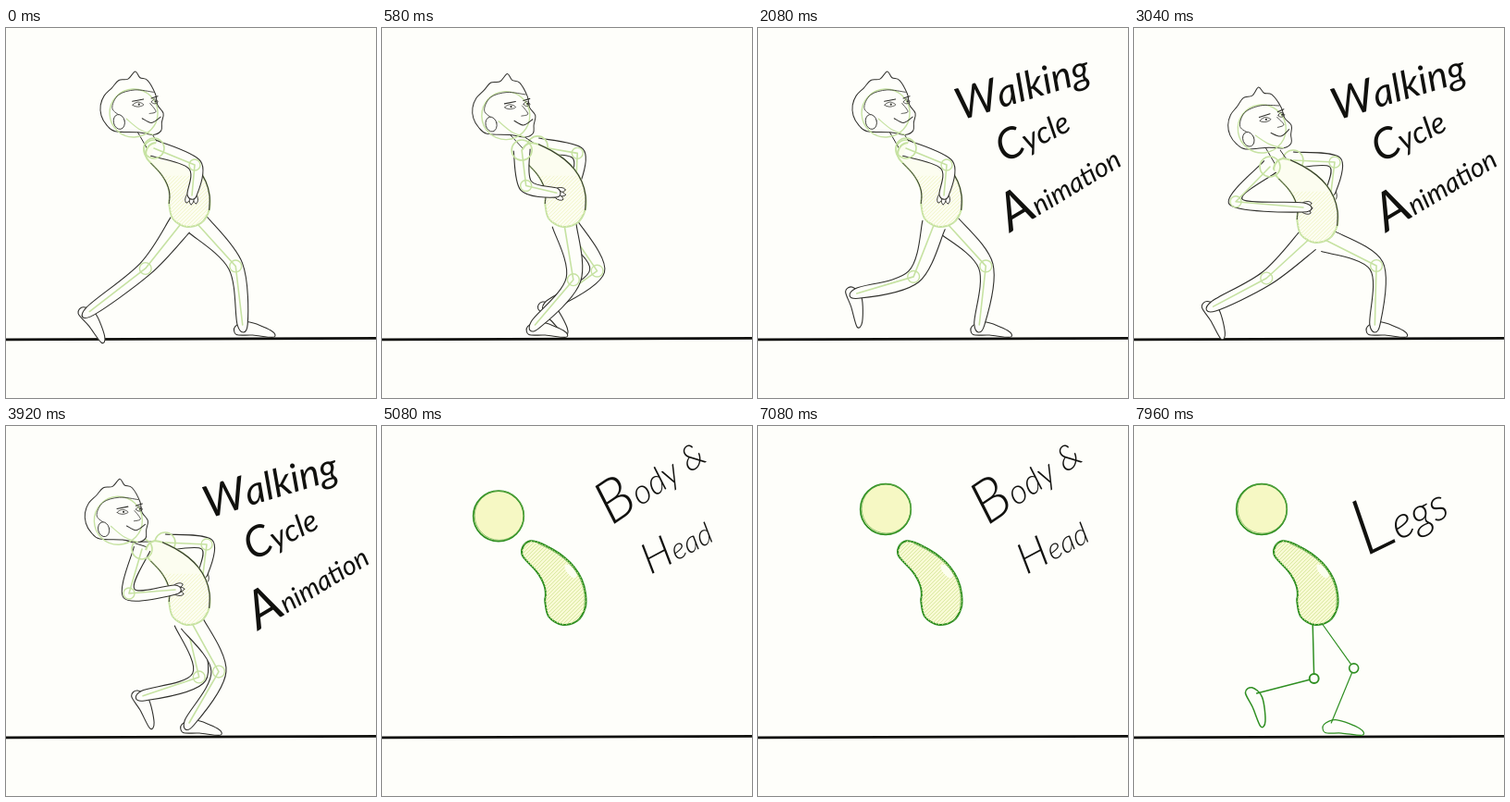
Recreate the animation shown at these times as an HTML page with a canvas. Size 400 by 400 pixels, loop 8000 ms.

```html
<!DOCTYPE html>
<html lang="en">
<head>
<meta charset="utf-8">
<title>Walking Cycle</title>
<style>
  html, body { margin: 0; width: 100%; height: 100%; overflow: hidden; background: #fefefa; }
  canvas { display: block; width: 100vw; height: 100vh; }
</style>
</head>
<body>
<canvas id="stage" width="400" height="400"></canvas>
<script>
const ctx = document.getElementById('stage').getContext('2d');
const LOOP = 8000, FPS = 24, CYCLE = 17;
const PAPER = '#fefefa', INK = '#30302c', SKETCH = '#c6e2a2', GREEN = '#2f8f22', BLACK = '#11110e';
const TAU = Math.PI * 2;
const { sin, cos, max, min, hypot, atan2, acos } = Math;

const mix = (a, b, k) => a + (b - a) * k;
const clamp = (v, low, high) => max(low, min(high, v));

// A wave over one cycle that peaks at 1, and the same wave without its negative half.
const wave = (u, peak) => cos(TAU * (u - peak));
const bump = (u, peak, power) => max(0, wave(u, peak)) ** power;

function paint(fill, stroke, width = 1) {
  if (fill) { ctx.fillStyle = fill; ctx.fill(); }
  if (stroke) { ctx.strokeStyle = stroke; ctx.lineWidth = width; ctx.stroke(); }
}

// Smooth curve through [x, y] points.
function curve(pts, closed) {
  const n = pts.length;
  const at = i => pts[closed ? (i + n) % n : clamp(i, 0, n - 1)];
  ctx.beginPath();
  ctx.moveTo(...pts[0]);
  for (let i = 0; i < (closed ? n : n - 1); i++) {
    const [a, b, c, d] = [at(i - 1), at(i), at(i + 1), at(i + 2)];
    ctx.bezierCurveTo(b[0] + (c[0] - a[0]) / 6, b[1] + (c[1] - a[1]) / 6,
      c[0] - (d[0] - b[0]) / 6, c[1] - (d[1] - b[1]) / 6, ...c);
  }
}

function stroke(pts, color, width) {
  curve(pts, false);
  paint(null, color, width);
}

function line(pts, color, width) {
  ctx.beginPath();
  for (const p of pts) ctx.lineTo(...p);
  paint(null, color, width);
}

function disc(x, y, r, fill, color, width) {
  ctx.beginPath();
  ctx.arc(x, y, r, 0, TAU);
  paint(fill, color, width);
}

function hatch(x, y, size, gap, color) {
  ctx.save();
  ctx.clip();
  for (let d = -size; d < size; d += gap) line([[x + d, y + size], [x + d + size, y]], color, .8);
  ctx.restore();
}

// The body is a bent spine whose radius grows towards the hips.
const SIDE = 7;
const BEAN = (() => {
  const pts = [];
  const put = (t, turn) => {
    const s = 1 - t, r = 12 + 10 * sin(t * TAU / 4);
    const x = s * s * 163 + 2 * s * t * 203 + t * t * 198;
    const y = s * s * 136 + 2 * s * t * 161 + t * t * 193;
    const heading = atan2(mix(25, 32, t), mix(40, -5, t)) + turn * TAU / 4;
    pts.push([x + r * cos(heading), y + r * sin(heading)]);
  };
  for (let i = 0; i < SIDE; i++) put(i / (SIDE - 1), -1);
  for (let a = -.5; a <= .5; a += .5) put(1, a);
  for (let i = SIDE - 1; i >= 0; i--) put(i / (SIDE - 1), 1);
  for (let a = 1.5; a <= 2.5; a += .5) put(0, a);
  return pts;
})();

// --- Motion ---

const dropAt = u => 17 * bump(u, .53, 3);

function headAt(u) {
  const back = bump(u, .747, 12);
  return { x: 138 - 18 * back, y: 90 + 11 * back, tilt: -.03 - dropAt(u) * .007 };
}

// u = 0 is the heel strike in front, u = .5 the push-off behind.
function legAt(u, drop) {
  const ax = 173 + 89 * wave(u, .06);
  const ay = 321 - 34 * bump(u, .68, 1);
  const pitch = .32 + 1.2 * bump(u, .65, .7);
  const hx = 198 + (ax - 173) * .12, hy = 213 + drop;
  const reach = hypot(ax - hx, ay - hy);
  const thigh = 60, shin = max(64, reach - 59);
  const bend = acos(clamp((thigh ** 2 + reach ** 2 - shin ** 2) / (2 * thigh * reach), -1, 1));
  const angle = atan2(ay - hy, ax - hx) - bend;
  return { hip: [hx, hy], knee: [hx + thigh * cos(angle), hy + thigh * sin(angle)], ankle: [ax, ay], pitch };
}

// Shoulder, elbow and hand between the arm's two extremes.
function armAt(u, forward, back) {
  const k = clamp(.5 + 1.75 * wave(u, .59), 0, 1);
  return forward.map((p, i) => p.map((v, j) => mix(v, back[i][j], k)));
}

function nearArmAt(u) {
  const flare = dropAt(u);
  return armAt(u, [[160, 130], [204, 148], [201, 181]],
    [[147, 133], [133 - flare * 1.35, 181 - flare * .6], [183, 177]]);
}

const farArmAt = u => armAt(u, [[160, 132], [199, 151], [203, 179]], [[172, 126], [217, 128], [213, 160]]);

// --- Drawing ---

function limb(joints, widths) {
  const [a, b, c] = joints;
  const upper = atan2(b[1] - a[1], b[0] - a[0]), lower = atan2(c[1] - b[1], c[0] - b[0]);
  const bend = atan2(sin(lower - upper), cos(lower - upper));
  const angles = [upper, upper + bend / 2, lower];
  const side = sign => joints.map(([x, y], i) =>
    [x - sin(angles[i]) * widths[i] * sign, y + cos(angles[i]) * widths[i] * sign]);
  curve([...side(1), ...side(-1).reverse()], false);
  paint(PAPER, INK, 1.1);
  line(joints, SKETCH, 1.6);
  disc(...b, widths[1] * .8, null, SKETCH, 1.4);
}

function foot([x, y], pitch, color, width) {
  ctx.save();
  ctx.translate(x, y);
  ctx.rotate(pitch);
  curve([[-7, 4], [-3, 12], [14, 7], [36, 2], [31, -4], [5, -5]], true);
  paint(PAPER, color, width);
  ctx.restore();
}

function drawLeg(u, drop) {
  const { hip, knee, ankle, pitch } = legAt(u, drop);
  foot(ankle, pitch, INK, 1.1);
  limb([hip, knee, ankle], [13, 8, 5.5]);
}

function drawWireLeg(u, width) {
  const { hip, knee, ankle, pitch } = legAt(u, 0);
  foot(ankle, pitch, GREEN, width);
  line([hip, knee, ankle], GREEN, width);
  disc(...knee, 5, PAPER, GREEN, width + .4);
}

function drawArm(joints) {
  const [shoulder, elbow, hand] = joints;
  ctx.save();
  ctx.translate(...hand);
  ctx.rotate(atan2(hand[1] - elbow[1], hand[0] - elbow[0]));
  for (const y of [-4, 0, 4]) {
    ctx.beginPath();
    ctx.ellipse(3, y, 7 - Math.abs(y) / 3, 2.6, y / 16, 0, TAU);
    paint(PAPER, INK, .9);
  }
  ctx.restore();
  limb(joints, [9, 7.5, 5]);
  disc(...shoulder, 11, null, SKETCH, 1.6);
}

function drawTorso() {
  curve(BEAN, true);
  paint('#fcfdf0', SKETCH, 2);
  hatch(150, 160, 76, 4, '#f1f5c6');
  stroke(BEAN.slice(0, SIDE), INK, 1.1);
  stroke(BEAN.slice(SIDE + 3, SIDE * 2 + 3), INK, 1);
}

function drawHead({ x, y, tilt }) {
  ctx.save();
  ctx.translate(x, y);
  ctx.rotate(tilt);
  const back = [];
  for (let a = 2.1; a < 4.3; a += .4) back.push([-5 + 31 * cos(a), -3 + 28 * sin(a)]);
  const quiff = [[-15, -34], [-5, -35], [3, -43], [8, -36], [16, -33]];
  const face = [[24, -18], [26, -6], [32, 3], [30, 13], [29, 22], [20, 26], [4, 23]];
  curve([...back, ...quiff, ...face], true);
  paint(PAPER, INK, 1);
  disc(0, 2, 26, null, SKETCH, 1.4);
  stroke([[-14, 5], [-23, -4], [-16, -18], [2, -23], [22, -20]], INK, .8);
  stroke([[-8, 8], [6, 20], [20, 26]], SKETCH, 1.2);
  ctx.beginPath();
  ctx.ellipse(-16, 11, 6, 8, -.2, 0, TAU);
  paint(PAPER, INK, .9);
  for (const [ex, w] of [[5, 6], [23, 3.5]]) {
    const ey = -6 - ex * .15;
    curve([[ex - w, ey], [ex, ey - 3], [ex + w, ey], [ex, ey + 2]], true);
    paint(null, INK, .8);
    disc(ex + 1, ey - .5, 1.1, INK);
    line([[ex - w, ey - 4], [ex + w, ey - 6]], INK, 1.1);
  }
  stroke([[18, -8], [24, 1], [17, 3]], INK, .8);
  stroke([[9, 8], [19, 13], [29, 7]], INK, 1);
  ctx.restore();
}

function drawFigure(u) {
  const drop = dropAt(u), head = headAt(u);
  const withDrop = draw => {
    ctx.save();
    ctx.translate(0, drop);
    draw();
    ctx.restore();
  };
  withDrop(() => drawArm(farArmAt(u)));
  drawLeg(u, drop);
  drawLeg(u + .5, drop);
  withDrop(() => {
    line([[head.x + 4, head.y + 22], [153, 131]], INK, 1);
    line([[head.x + 20, head.y + 25], [165, 125]], INK, 1);
    drawTorso();
    drawArm(nearArmAt(u));
    drawHead(head);
  });
}

function drawShapes(u) {
  const { x, y } = headAt(u);
  disc(x, y, 27.3, '#f6f8c4', GREEN, 1.7);
  disc(x + .8, y - .6, 26.6, null, '#6bb04f', .7);
  curve(BEAN, true);
  paint('#f8fad4', GREEN, 2);
  hatch(146, 120, 100, 4, '#d5e596');
  ctx.beginPath();
  ctx.ellipse(204, 157, 4, 9, -.7, 0, TAU);
  paint('#fdfef0');
  stroke(BEAN.slice(0, SIDE).map(([px, py]) => [px - 1, py + 1]), '#6bb04f', .9);
}

// A tall initial followed by smaller letters on a slanted baseline.
function write(initial, rest, x, y, degrees, big, small, weight) {
  const font = size => `italic ${weight} ${size}px Lato, "Open Sans", sans-serif`;
  ctx.save();
  ctx.translate(x, y);
  ctx.rotate(degrees * TAU / 360);
  ctx.fillStyle = BLACK;
  ctx.font = font(big);
  ctx.fillText(initial, 0, 0);
  const advance = ctx.measureText(initial).width;
  ctx.font = font(small);
  ctx.fillText(rest, advance, 0);
  ctx.restore();
}

function writeTitle() {
  write('W', 'alking', 219, 100, -17, 48, 42, 400);
  write('C', 'ycle', 266, 146, -26, 46, 33, 400);
  write('A', 'nimation', 273, 221, -31, 56, 29, 400);
}

function writeParts() {
  write('B', 'ody &', 248, 108, -34, 64, 37, 300);
  write('H', 'ead', 290, 161, -28, 46, 32, 300);
}

const SCENES = [
  { until: 24, shift: 0, draw: drawFigure },
  { until: 108, shift: 4, draw: u => { drawFigure(u); writeTitle(); } },
  { until: 176, shift: 9, draw: u => { drawShapes(u); writeParts(); } },
  { until: 192, shift: 0, draw: u => {
    drawWireLeg(u, 1.2);
    drawWireLeg(u + .5, 1.5);
    drawShapes(u);
    write('L', 'egs', 251, 141, -26, 84, 48, 300);
  } }
];

function render(time) {
  // The small lead keeps each step on the 10 ms grid it starts on.
  const step = Math.floor((time % LOOP + 10) * FPS / 1000) % (LOOP * FPS / 1000);
  const scene = SCENES.find(s => step < s.until);
  ctx.fillStyle = PAPER;
  ctx.fillRect(0, 0, 400, 400);
  ctx.lineCap = ctx.lineJoin = 'round';
  line([[0, 336.8], [400, 335.3]], BLACK, 2.7);
  scene.draw((step + scene.shift) % CYCLE / CYCLE);
  requestAnimationFrame(() => render(performance.now() - start));
}

const start = performance.now();
render(0);
</script>
</body>
</html>
```
